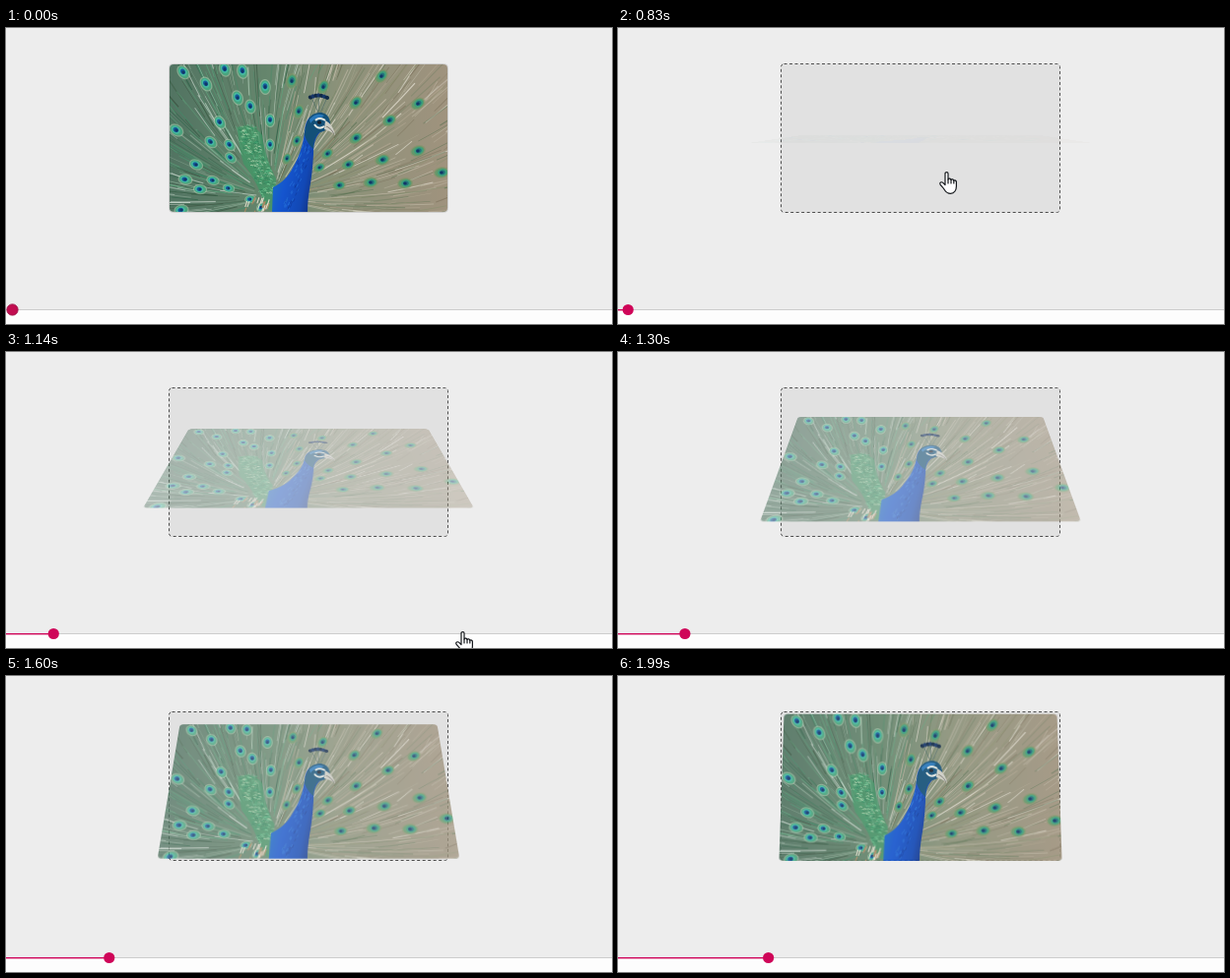
An HTML page with a canvas for the animation above (2070 ms loop, 615 by 301 pixels).

```html
<!DOCTYPE html>
<html lang="en">
<head>
<meta charset="utf-8">
<title>Flip in</title>
<style>
  html, body { margin: 0; width: 100%; height: 100%; overflow: hidden; background: #ededed; }
  #stage { position: absolute; left: 0; top: 0; width: 615px; height: 301px; overflow: hidden; }
  svg { position: absolute; left: 0; top: 0; display: block; }
  #card { position: absolute; left: 166px; top: 37px; width: 282px; height: 150px; border-radius: 4px; }
</style>
</head>
<body>
<div id="stage">
  <svg width="615" height="301">
    <rect width="615" height="301" fill="#ededed"/>
    <rect y="287" width="615" height="14" fill="#fdfdfd"/>
    <rect id="rim" x="165.5" y="36.5" width="283" height="151" rx="4" fill="none" stroke="#cfcfcf"/>
    <rect id="slot" x="165.5" y="36.5" width="283" height="151" rx="3" fill="#e1e1e1" stroke="#4c4c4c" stroke-dasharray="3 2.5"/>
  </svg>
  <canvas id="card" width="564" height="300"></canvas>
  <svg width="615" height="301">
    <rect y="286" width="615" height="1" fill="#cdcdcd"/>
    <rect id="fill" y="286" height="1.4" fill="#cf0558"/>
    <circle id="thumb" cy="286.5" r="5.6" fill="#c60c55"/>
    <g id="hand" stroke="#15181c" stroke-width="1.2" stroke-linejoin="round" stroke-linecap="round">
      <path fill="#fff" d="M6 1.9C6 .2 9 .2 9 1.9V8C9.5 6.8 11.8 7 12 8.3C12.8 7.4 14.6 7.8 14.8 9.2C15.8 8.5 17.4 9.2 17.4 10.6V15C17.4 18.5 15.5 22.4 11.5 22.4C7.5 22.4 6.5 20.5 5 18C3.8 16 2 14.5 .9 12.8C.2 11.2 2.2 10 3.8 11.4L6 13.6Z"/>
      <path fill="none" d="M9 8V12M12 8.3V12M14.8 9.2V12"/>
    </g>
  </svg>
</div>
<script>
const $ = id => document.getElementById(id);
const card = $('card'), c = card.getContext('2d');

let seed = 17;
const rnd = () => (seed = (seed * 16807) % 2147483647) / 2147483647;
const between = (a, b) => a + (b - a) * rnd();
const mix = (a, b, u) => a + (b - a) * u;
const clamp = v => Math.max(0, Math.min(1, v));

function shape(d, color) {
  c.fillStyle = color;
  c.fill(new Path2D(d));
}
function line(d, color, width) {
  c.strokeStyle = color;
  c.lineWidth = width;
  c.stroke(new Path2D(d));
}
function oval(x, y, rx, ry, angle, color) {
  c.fillStyle = color;
  c.beginPath();
  c.ellipse(x, y, rx, ry, angle, 0, 7);
  c.fill();
}

const HUB = [104, 134];
// Eye spots of the tail, x and y in turn
const EYES = [
  14,8, 37,20, 56,5, 74,7, 97,23, 124,17, 156,23, 189,39, 215,12, 252,40,
  223,57, 252,88, 216,97, 239,121, 276,110, 204,120, 172,123, 189,75, 181,102, 152,105,
  160,91, 131,48, 102,57, 82,43, 69,34, 51,59, 42,79, 7,67, 27,102, 16,117,
  31,127, 44,118, 60,126, 62,95, 82,137, 12,148, 93,145, 61,82, 102,82, 119,96, 129,78
];

function drawBackdrop() {
  const g = c.createLinearGradient(0, 0, 282, 0);
  g.addColorStop(0, '#527462');
  g.addColorStop(.35, '#66866d');
  g.addColorStop(.6, '#8b927a');
  g.addColorStop(1, '#a0937e');
  c.fillStyle = g;
  c.fillRect(0, 0, 282, 150);
}

function drawPlumes() {
  const cool = ['#d6e2d9', '#2f6248', '#5fa57d', '#a8c6b0', '#39533f', '#428d69'];
  const warm = ['#e3ded1', '#796f59', '#c8c0ae', '#8d9172', '#b4a994', '#5f7556'];
  for (let i = 0; i < 760; i++) {
    const a = between(-3.6, .32), r = between(14, 190), len = between(18, 75);
    const right = Math.cos(a) > between(.05, .45);
    const bend = right ? -.05 : .04;
    const at = (s, k) => (HUB[0] + Math.cos(a + k) * s).toFixed(1) + ' ' + (HUB[1] + Math.sin(a + k) * s).toFixed(1);
    const set = right ? warm : cool;
    c.globalAlpha = between(.3, .8);
    line(`M${at(r, 0)}Q${at(r + len / 2, bend / 2)} ${at(r + len, bend)}`, set[Math.floor(rnd() * 6)], between(.35, 1.2));
  }
  c.globalAlpha = 1;
}

function drawEyes() {
  for (let i = 0; i < EYES.length; i += 2) {
    const x = EYES[i], y = EYES[i + 1];
    const a = Math.atan2(y - HUB[1], x - HUB[0]);
    const far = clamp(Math.hypot(x - HUB[0], y - HUB[1]) / 110);
    const k = mix(.65, 1, far), left = x < 110;
    const ex = x + Math.cos(a) * .8, ey = y + Math.sin(a) * .8;
    oval(x, y, 8 * k, 5.8 * k, a, left ? 'rgba(176,209,179,.55)' : 'rgba(128,148,104,.6)');
    oval(x, y, 6.7 * k, 4.7 * k, a, left ? '#4aa57e' : '#64986b');
    oval(ex, ey, 4.8 * k, 3.6 * k, a, left ? '#45b9a0' : '#3ba07c');
    oval(ex, ey, 3 * k, 2.4 * k, a, left ? '#155c9b' : '#23707c');
    oval(x, y, 1.7 * k, 1.4 * k, a, '#123666');
  }
}

function drawScales() {
  shape('M69 64Q84 58 94 72Q98 98 108 116L107 150L98 146Q89 119 75 101Q70 84 69 64Z', 'rgba(65,151,102,.75)');
  for (let i = 0; i < 260; i++) {
    const u = rnd(), x = mix(78, 103, u) + between(-11, 7) , y = mix(63, 132, u) + between(-5, 5);
    c.globalAlpha = between(.45, .95);
    const tone = ['#2b805b', '#71c693', '#b6d9b2', '#43a572'][i % 4];
    line(`M${x} ${y}q1.4 -1.6 2.6 .5`, tone, .8);
  }
  c.globalAlpha = 1;
  for (let i = 0; i < 22; i++) {
    const x = between(76, 103), y = between(134, 150);
    line(`M${x} ${y}l-2 6`, i % 2 ? '#a88a64' : '#e0dccb', 1.1);
  }
}

function drawBird() {
  const neck = c.createLinearGradient(105, 115, 148, 124);
  neck.addColorStop(0, '#1769c5');
  neck.addColorStop(.3, '#1555cf');
  neck.addColorStop(.75, '#1248b5');
  neck.addColorStop(1, '#123382');
  c.fillStyle = neck;
  c.fill(new Path2D('M104 150L105 125Q119 118 125 105Q135 88 137 68Q138 51 152 49Q161 49 163 60Q161 67 153 69Q146 75 146 91Q145 111 142 127Q140 140 140 150Z'));
  shape('M137 72Q138 50 152 49Q162 49 163 60Q160 68 152 69Q146 74 146 86Q140 81 137 72Z', '#135078');
  for (let i = 0; i < 70; i++) {
    const u = rnd(), x = mix(141, 119, u) + between(-4, 6), y = mix(78, 146, u);
    c.globalAlpha = .5;
    line(`M${x} ${y}l-1.5 3`, i % 3 ? '#2a79df' : '#0d338f', .9);
  }
  c.globalAlpha = 1;
  shape('M142 56Q149 48 157 52L153 55Q147 54 143 60Z', '#2877ba');
  line('M148 57Q152 53 158 57M147 61Q151 67 157 63', '#e5e9e4', 2);
  oval(152, 59, 2, 1.8, 0, '#161e2b');
  shape('M158 57Q166 61 168 72Q164 68 157 66Z', '#cfcfc6');
  line('M159 63Q164 65 167 71', '#77766f', .7);
  line('M151 49L145 36M152 49L151 34M153 49L159 36', '#4f6c68', .6);
  for (let i = 0; i < 7; i++) oval(143 + i * 2.8, 33.5 - 2 * Math.sin(i * .55), 2.3, 2, .5, i % 2 ? '#17376a' : '#102947');
}

function drawPicture() {
  c.scale(2, 2);
  drawBackdrop();
  drawPlumes();
  drawEyes();
  drawScales();
  drawBird();
}

const LOOP = 2070, FLIP = 830;
const TICKS = [0, 70, 150, 220, 300, 450, 830, 910, 990, 1060, 1140, 1220,
  1300, 1370, 1450, 1530, 1600, 1680, 1760, 1830, 1910, 1990];

function moveHand(t) {
  const hand = $('hand');
  hand.style.display = t < 70 || t >= 1220 ? 'none' : '';
  let x = 326, y = 146;
  if (t < 450) {
    const u = 1 - (1 - clamp((t - 70) / 230)) ** 2;
    x = mix(375, 327, u);
    y = mix(263, 146, u);
  } else if (t >= FLIP) {
    let u = clamp((t - FLIP) / 310);
    u = u * u * (3 - 2 * u);
    x = mix(326, 456, u);
    y = mix(146, 284, u);
  }
  const s = t >= 450 && t < FLIP ? 1.05 : 1;
  hand.setAttribute('transform', `translate(${x} ${y}) scale(${s})`);
}

function render(ms) {
  const t = TICKS.filter(v => v <= ms).pop();
  const on = t >= FLIP, d = t - FLIP;
  const angle = on ? 87 - .0995 * d + 2.52e-5 * d * d : 0;
  const x = on ? 10.2 + .1228 * d : 6.5;

  card.style.transform = on ? `perspective(400px) rotateX(${angle}deg)` : 'none';
  card.style.opacity = on ? .93 * (1 - (angle / 90) ** 1.4) : 1;
  $('slot').style.display = on ? '' : 'none';
  $('rim').style.display = on ? 'none' : '';
  $('fill').setAttribute('width', on ? x : 0);
  $('thumb').setAttribute('cx', x);
  $('thumb').setAttribute('fill', on ? '#cf0558' : '#c20d50');
  $('thumb').setAttribute('stroke', on ? 'none' : '#a00d45');
  moveHand(t);
}

function loop() {
  render(performance.now() % LOOP);
  requestAnimationFrame(loop);
}
drawPicture();
loop();
</script>
</body>
</html>
```
